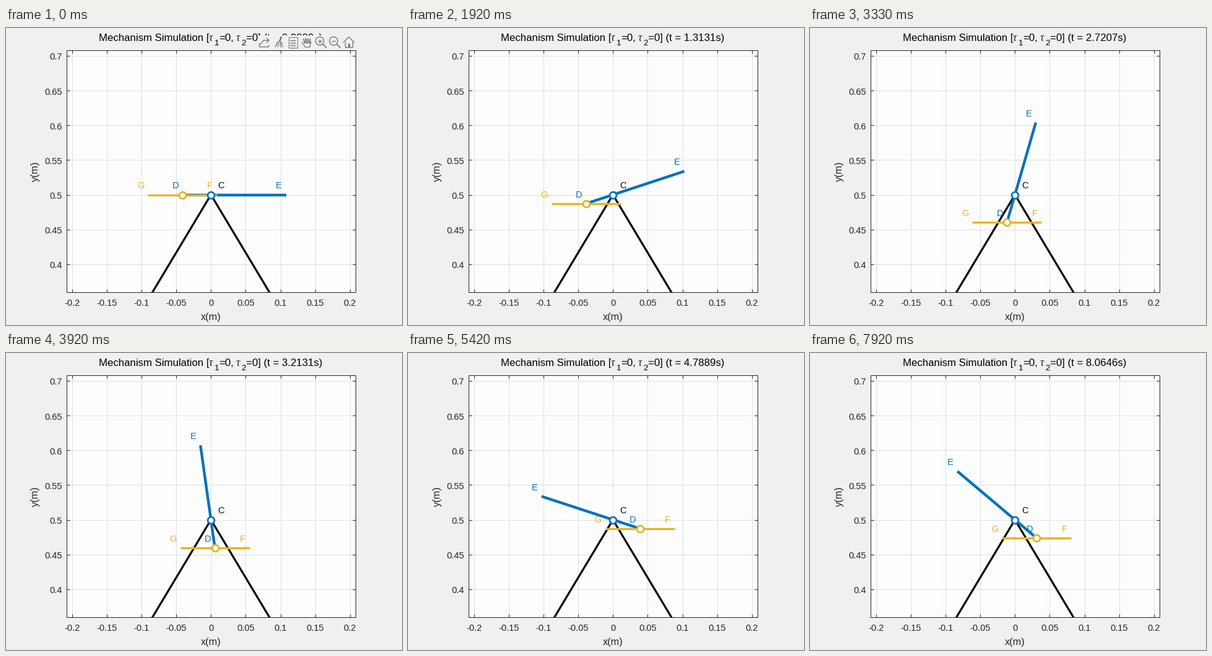
Animation of 640x480 px, one loop 8000 ms. Source, as a matplotlib script:

```python
import numpy as np
import matplotlib.pyplot as plt
from matplotlib.animation import FuncAnimation
from matplotlib.patches import Circle, Rectangle

W, H, DPI = 640, 480, 100
FRAMES, LOOP_MS = 160, 8000
STEPS = 96                          # simulation pictures per loop
PT = 72 / DPI                       # points per pixel

BACK, PLOT, GRID = "#f0f0f0", "#fdfdfd", "#dfdfdf"
DARK, BLUE, YELLOW, GREY = "#262626", "#0072bd", "#edb120", "#727272"
LEFT, RIGHT, TOP, BOTTOM = 97.5, 564.5, 35.5, 426.5
CX, CY, SCALE = 331.2, 269.5, 1123  # joint C on screen, pixels per metre
CD, CE, ARM = 46, 121.5, 56         # link lengths in pixels

plt.rcParams["font.family"] = "Liberation Sans"
fig = plt.figure(figsize=(W / DPI, H / DPI), dpi=DPI, facecolor=BACK)
ax = fig.add_axes([0, 0, 1, 1])
ax.set(xlim=(0, W), ylim=(H, 0))
ax.axis("off")


def text(x, y, s, size, color=DARK, ha="left", va="baseline", **kw):
    return ax.text(x, y, s, fontsize=size * PT, color=color, ha=ha, va=va,
                   zorder=6, **kw)


def line(xs, ys, color, width, z=2, **kw):
    return ax.plot(xs, ys, color=color, lw=width * PT, zorder=z,
                   solid_capstyle="butt", **kw)[0]


def rect(x0, y0, x1, y1, z, fc="none", ec="none", lw=1):
    return ax.add_patch(Rectangle((x0, y0), x1 - x0, y1 - y0, fc=fc, ec=ec,
                                  lw=lw * PT, zorder=z))


def ring(color):
    return ax.plot([CX], [CY], "o", ms=10.8 * PT, mfc="white", mec=color,
                   mew=2.7 * PT, zorder=8)[0]


def screen(x, y):
    return CX + x * SCALE, CY - (y - 0.5) * SCALE


def draw_axes():
    box = rect(LEFT, TOP, RIGHT, BOTTOM, 0, fc=PLOT)
    for v in np.arange(-4, 5) * 0.05:
        x = screen(v, 0)[0]
        line([x, x], [TOP, BOTTOM], GRID, 1, 1)
        for y, end in ((BOTTOM, BOTTOM - 5), (TOP, TOP + 5)):
            line([x, x], [y, end], DARK, 1, 5)
        text(x, 449, f"{v:g}", 14.67, ha="center")
    for v in np.arange(8, 15) * 0.05:
        y = screen(0, v)[1]
        line([LEFT, RIGHT], [y, y], GRID, 1, 1)
        for x, end in ((LEFT, LEFT + 5), (RIGHT, RIGHT - 5)):
            line([x, end], [y, y], DARK, 1, 5)
        text(91, y + 6.6, f"{v:g}", 14.67, ha="right")
    rect(LEFT, TOP, RIGHT, BOTTOM, 5, ec=DARK)
    text(CX, 471.8, "x(m)", 16.3, ha="center")
    text(47, 231.5, "y(m)", 16.3, ha="center", va="center", rotation=90)
    for side in (-1, 1):
        fx, fy = screen(0.3 * side, 0)
        line([CX, fx], [CY, fy], "black", 3.2).set_clip_path(box)


def draw_title():
    base, size = 21.3, 16.75
    text(150, base, "Mechanism Simulation [", size, "black")
    for x, n in ((328, "1"), (372, "2")):
        text(x, base, "τ", 18, family="Liberation Serif", style="italic")
        text(x + 8.5, base + 7, n, 13.4, "black")
    text(344.5, base, "=0,", size, "black")
    return text(388, base, "", size, "black")


def draw_toolbar():
    parts = [rect(407, 11.5, 567, 35, 8, fc=BACK)]

    def stroke(*pts, width=1.3):
        parts.append(line(*zip(*pts), GREY, width, 9))

    # export arrow
    stroke((409, 24), (409, 30), (424, 30), (424, 27))
    stroke((411, 27), (416, 20), (425, 20))
    stroke((421, 16), (425, 20), (421, 24))
    # brush
    stroke((445, 14), (442, 22), width=2.6)
    for k in range(4):
        stroke((439 + 2 * k, 22), (435 + 4 * k, 31))
    # page
    parts.append(rect(456.5, 14.5, 470.5, 31.5, 9, ec=GREY))
    for y in (19.5, 23.5, 27.5):
        stroke((459, y), (468, y))
    # hand
    for k in range(4):
        stroke((481 + 3.5 * k, 16 + abs(k - 1.5)), (483 + 2.5 * k, 25), width=2)
    stroke((478, 23), (484, 31), (491, 31), (493, 22))
    # zoom in, zoom out
    for x in (507, 529.5):
        parts.append(ax.add_patch(Circle((x, 21), 6.7, fc="none", ec=GREY,
                                         lw=1.3 * PT, zorder=9)))
        stroke((x + 5, 26), (x + 11, 32), width=1.8)
        stroke((x - 3.5, 21), (x + 3.5, 21))
    stroke((507, 17.5), (507, 24.5))
    # home
    stroke((545, 23.5), (554, 14.5), (563, 23.5))
    stroke((548, 22), (548, 31), (560, 31), (560, 22))
    stroke((554, 25), (554, 31), width=3)
    return parts


def swing(t_end=8.2, dt=0.002, w=0.6077):
    """Angle of the bar: a frictionless pendulum released level."""
    times = np.arange(0, t_end, dt)
    angles, angle, speed = [], 0.0, 0.0
    for _ in times:
        angles.append(angle)
        speed += w * w * np.cos(angle) * dt
        angle += speed * dt
    return times, angles


draw_axes()
clock = draw_title()
toolbar = draw_toolbar()

bar = line([], [], BLUE, 4.4, 3)
slider = line([], [], YELLOW, 3.3, 4)
ring(BLUE)
pin = ring(YELLOW)
text(CX + 16.7, CY - 10.1, "C", 14.67, "black", "center")
labels = {n: text(0, 0, n, 14.67, c, "center")
          for n, c in zip("DEFG", (BLUE, BLUE, YELLOW, YELLOW))}

# (step, simulated seconds): the solver starts slowly, then varies its pace
PACE = ((0, 0), (8, 0.079), (23, 1.3131), (40, 2.7207), (47, 3.2131),
        (65, 4.7889), (80, 6.3479), (95, 8.0646))
swing_t, swing_angle = swing()


def update(frame):
    step = round(frame * STEPS / FRAMES)
    t = np.interp(step, *zip(*PACE))
    angle = np.interp(t, swing_t, swing_angle)
    u = np.array([np.cos(angle), -np.sin(angle)])
    c, arm = np.array([CX, CY]), np.array([ARM, 0])
    d, e = c - CD * u, c + CE * u
    f, g = d + arm, d - arm

    bar.set_data(*zip(d, e))
    slider.set_data(*zip(g, f))
    pin.set_data([d[0]], [d[1]])
    for label, p in zip(labels.values(), (d, e, f, g)):
        label.set_position(p + (-11.6, -10.1))
    clock.set_text(f"=0] (t = {t:.4f}s)")
    for part in toolbar:
        part.set_visible(step == 0)
    return [bar, slider, pin, clock, *labels.values(), *toolbar]


anim = FuncAnimation(fig, update, frames=FRAMES, interval=LOOP_MS / FRAMES,
                     repeat=True, repeat_delay=0, blit=False)
plt.show()
```
